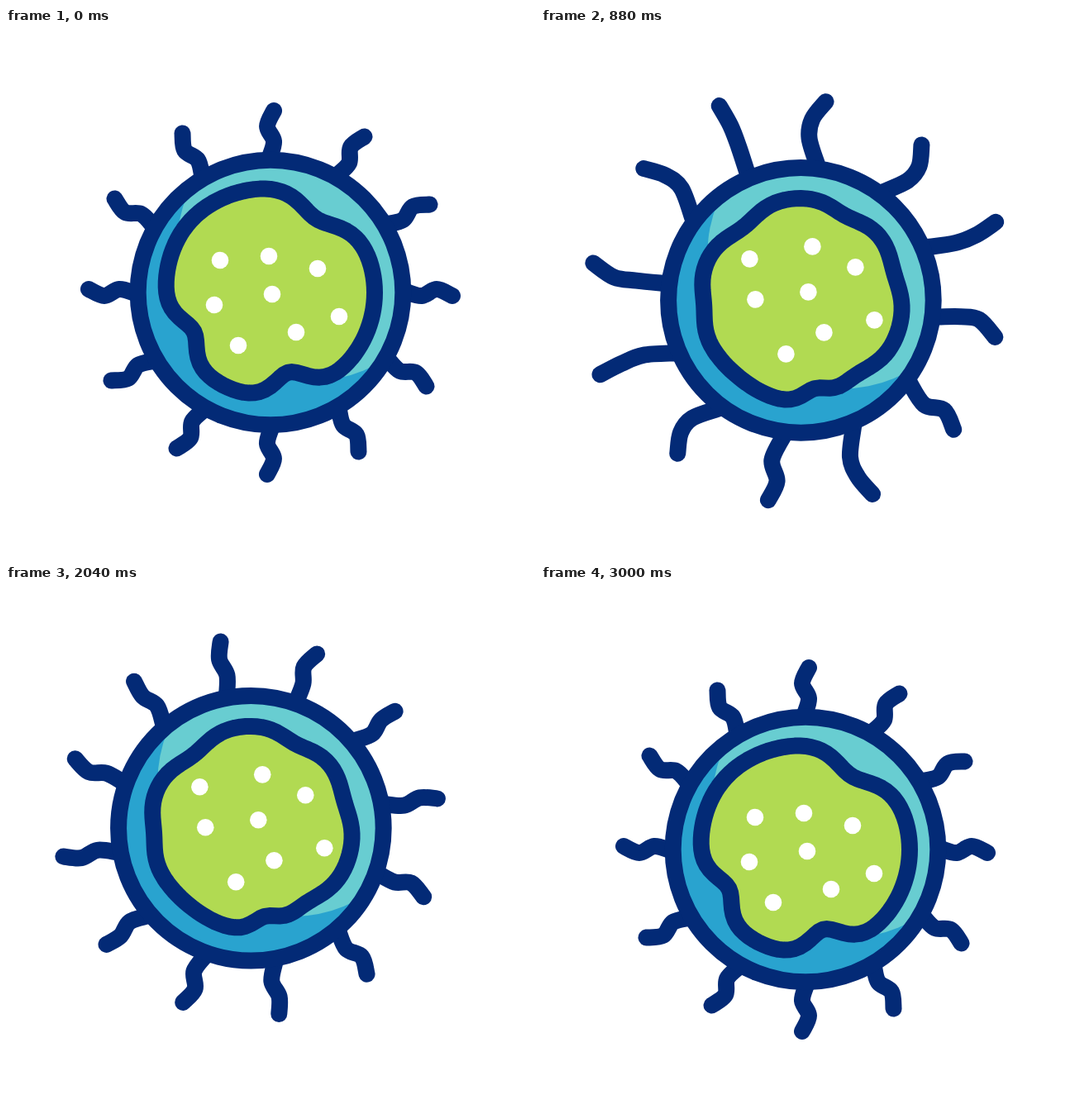
An HTML page that plays this animation: 640x640 px, repeating every 3.02 s.

```html
<!DOCTYPE html>
<html lang="en">
<head>
<meta charset="utf-8">
<title>Virus cell</title>
<style>
  html, body { margin: 0; width: 100%; height: 100%; overflow: hidden; background: #fff; }
  svg { display: block; width: 100vw; height: 100vh; }
  .line { stroke: #032a76; stroke-width: 20; stroke-linecap: round; stroke-linejoin: round; }
</style>
</head>
<body>
<svg viewBox="0 0 640 640">
  <clipPath id="disc"><circle r="158"/></clipPath>
  <g id="cell">
    <path id="arms" class="line" fill="none"/>
    <circle r="158" fill="#29a3cf"/>
    <circle cx="50" cy="-56" r="163" fill="#68cdd1" clip-path="url(#disc)"/>
    <circle r="160.3" fill="none" class="line"/>
    <path id="nucleus" class="line" fill="#b1da52"/>
    <g id="dots" fill="#fff"></g>
  </g>
</svg>
<script>
const LOOP = 3020, END = 3000;
const $ = id => document.getElementById(id);
const lerp = (a, b, k) => a + (b - a) * k;
const mix = (a, b, k) => a.map((v, i) => lerp(v, b[i], k));

function ease(t, from, to) {
  const u = Math.max(0, Math.min(1, (t - from) / (to - from)));
  return u * u * (3 - 2 * u);
}

// Point at a distance from the centre, sideways clockwise, at a bearing from the top.
function polar(side, radius, degrees) {
  const a = degrees * Math.PI / 180, c = Math.cos(a), s = Math.sin(a);
  return [side * c + radius * s, side * s - radius * c];
}

// Smooth open curve through points.
function curve(points) {
  const at = i => points[Math.max(0, Math.min(points.length - 1, i))];
  const f = v => v.toFixed(2);
  let d = `M${at(0).map(f)}`;
  for (let i = 0; i < points.length - 1; i++) {
    const [a, b, c, e] = [at(i - 1), at(i), at(i + 1), at(i + 2)];
    const h1 = b.map((v, j) => v + (c[j] - a[j]) / 6);
    const h2 = c.map((v, j) => v - (e[j] - b[j]) / 6);
    d += `C${h1.map(f)} ${h2.map(f)} ${c.map(f)}`;
  }
  return d;
}

// Resting places of the cell: time, x, y.
const route = [
  [0, 320, 320], [720, 313.2, 331.5], [800, 313.2, 331.5],
  [1350, 333.8, 295.3], [2270, 289.5, 294], [END, 320, 320]
];
function center(t) {
  const i = Math.max(1, route.findIndex(stop => t <= stop[0]));
  const from = route[i - 1], to = route[i];
  return mix(from, to, ease(t, from[0], to[0])).slice(1);
}

// Arms, tip to base as [side, radius]: one curl shared by all,
// and a stretched pose from length, tip offset and bend (unbent arms stay wavy).
const BASE = 164;
const curled = [[4, 220], [-4, 201], [4, 183], [-1, BASE]];
const arms = [
  [242, -7, -20], [238, -4, 10], [254, -3, 3], [239, 8, -10], [242, 6, 0], [250, 4, 13],
  [245, 2, 0], [238, 0, 13], [259, 4, 7], [255, 6, -7], [248, 5, 15], [255, -7, -3]
].map(([length, tip, bend]) => {
  const wave = bend ? 0 : 5;
  return [
    [tip, length],
    [bend - wave, lerp(BASE, length, 0.7)],
    [bend + wave, lerp(BASE, length, 0.4)],
    [-5, BASE]
  ];
});

function armPath(stretched, bearing, stretch) {
  return curve(curled.map((p, i) => polar(...mix(p, stretched[i], stretch), bearing)));
}

// Nucleus outline: a circle with dents [bearing, depth, width].
const relaxed = { radius: 126, dents: [[32, 21, 19], [167, 27, 15], [243, 22, 15], [310, -4, 30]] };
const tense = {
  radius: 123.5,
  dents: [[28, 8, 14], [74, 6, 15], [145, 11, 18], [171, 14, 11], [220, 4, 25], [267, 6, 14], [322, 11, 17]]
};
function radiusAt({ radius, dents }, bearing) {
  return dents.reduce((r, [at, depth, width]) => {
    const gap = (bearing - at + 540) % 360 - 180;
    return r - depth * Math.exp(-((gap / width) ** 2));
  }, radius);
}
function nucleusPath(tension) {
  const points = [];
  for (let a = 0; a < 360; a += 3) {
    points.push(polar(0, lerp(radiusAt(relaxed, a), radiusAt(tense, a), tension), a));
  }
  return `M${points.map(p => p.map(v => v.toFixed(2))).join("L")}Z`;
}

// Each dot drifts between a relaxed and a tense place.
const dots = [
  [[-61, -39], [-62, -50]], [[-2, -44], [14, -65]], [[57, -29], [66, -40]], [[-68, 15], [-55, -1]],
  [[2, 2], [9, -10]], [[83, 29], [89, 24]], [[31, 48], [28, 39]], [[-39, 64], [-18, 65]]
].map(([from, to]) => {
  const node = document.createElementNS("http://www.w3.org/2000/svg", "circle");
  node.setAttribute("r", 10.3);
  return { from, to, node: $("dots").appendChild(node) };
});

function draw(time) {
  const t = Math.min(time, END);
  const turn = 30 * t / END;
  const stretch = ease(t, 100, 850) - ease(t, 1540, 2280);
  const tension = ease(t, 0, 800) - ease(t, 2000, 2800);
  $("cell").setAttribute("transform", `translate(${center(t)})`);
  $("arms").setAttribute("d", arms.map((arm, k) => armPath(arm, 30 * k + turn, stretch)).join(""));
  $("nucleus").setAttribute("d", nucleusPath(tension));
  for (const { from, to, node } of dots) {
    const [x, y] = mix(from, to, tension);
    node.setAttribute("cx", x);
    node.setAttribute("cy", y);
  }
}

const start = performance.now();
function tick() {
  draw((performance.now() - start) % LOOP);
  requestAnimationFrame(tick);
}
tick();
</script>
</body>
</html>
```
